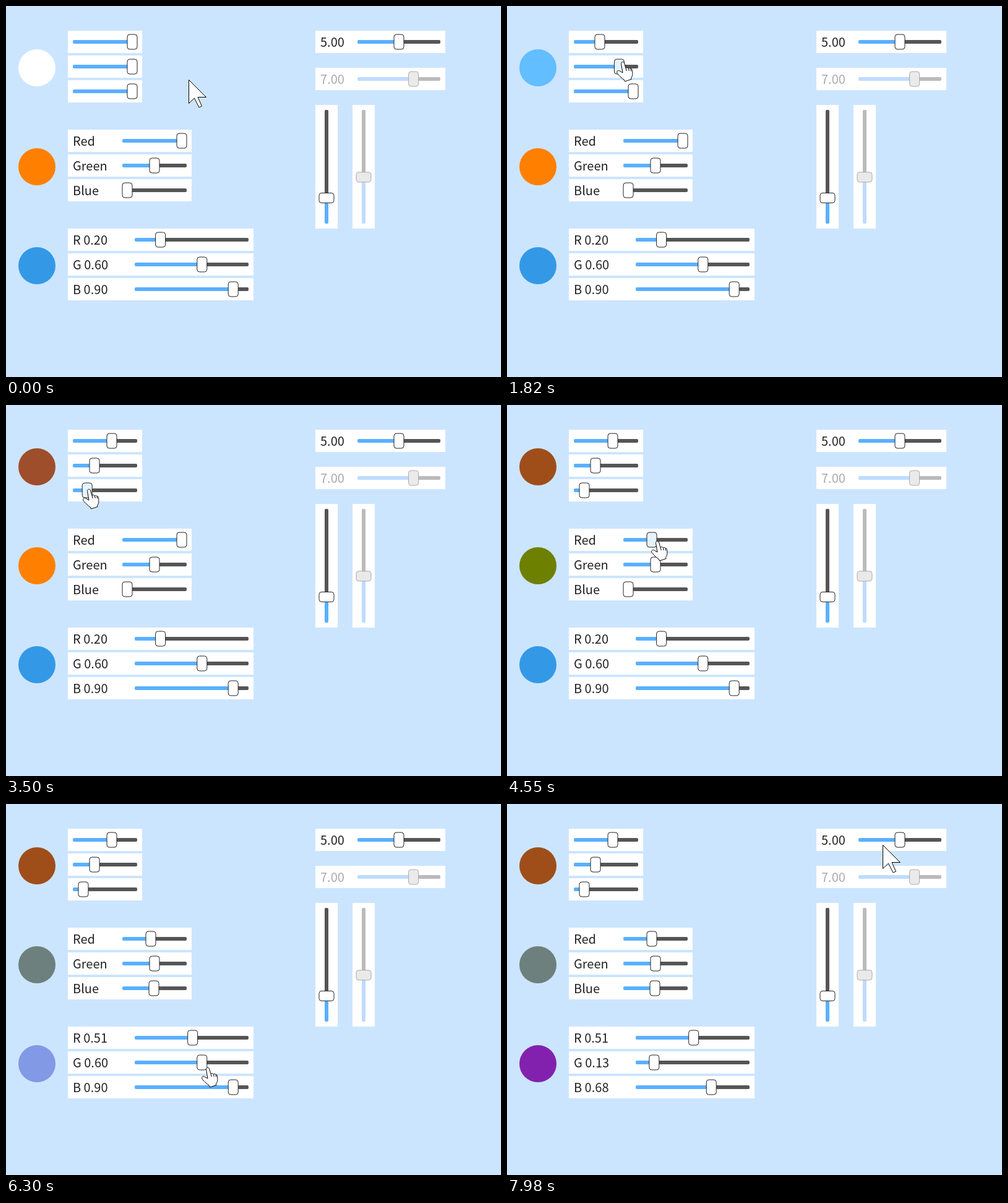
An HTML page with a canvas that plays this animation: 800 px wide and 600 px high, repeating every 8 s.

```html
<!DOCTYPE html>
<html lang="en">
<head>
<meta charset="utf-8">
<title>Sliders</title>
<style>
html, body { margin: 0; width: 100%; height: 100%; overflow: hidden; background: #cce5ff; }
canvas { display: block; }
</style>
</head>
<body>
<canvas id="stage" width="800" height="600"></canvas>
<script>
const ctx = document.getElementById('stage').getContext('2d');
const LOOP = 8000, STEP = 70;
const START = { x: 295, y: 119 }, END = { x: 607, y: 66 };

const group = (y, w, inset, labels, values) => labels.map((label, i) =>
  ({ x: 100, y: y + 40 * i, w, inset, label, start: values[i] }));
const sliders = [
  ...group(40, 120, 8, ['', '', ''], [1, 1, 1]),
  ...group(200, 200, 88, ['Red', 'Green', 'Blue'], [1, .5, 0]),
  ...group(360, 300, 108, ['R #', 'G #', 'B #'], [.2, .6, .9]),
  { x: 500, y: 40, w: 210, inset: 68, label: '5.00', start: .5 },
  { x: 500, y: 100, w: 210, inset: 68, label: '7.00', start: .7, off: true },
  { x: 500, y: 360, w: 200, inset: 8, label: '', start: .2, upright: true },
  { x: 560, y: 360, w: 200, inset: 8, label: '', start: .4, upright: true, off: true }
];

// The pointer reaches a thumb, grips it off-centre by dx, dy, drags it to a value and lets go.
const drag = (index, value, reach, release, dx, dy) => ({ index, value, reach, release, dx, dy });
const drags = [
  drag(0, .99, 700, 840, 1, -1),
  drag(0, .386, 910, 1400, 1, -1),
  drag(1, .307, 1680, 2240, 7, -6),
  drag(0, .625, 2520, 2870, 2, -4),
  drag(2, .102, 3150, 3710, 4, 0),
  drag(3, .432, 4200, 4550, 10, 4),
  drag(5, .489, 5040, 5320, 4, -3),
  drag(6, .51, 5740, 6090, 1, 0),
  drag(7, .13, 6300, 6860, 10, 10),
  drag(8, .68, 7280, 7490, -7, 2)
];

const arrow = new Path2D('M0 0V38L9 29.5 16.5 44.5 21 42.5 14.5 28H28Z');
const hand = new Path2D('M-4 1C-4.5 -2.5 0 -3.5 1 -.5L3.5 8C5 6.5 7 7 8 8.5' +
  'C9.5 7.3 11 7.8 11.7 9.5C13 8.7 14 10 14 12C14.5 17 15 20 12 24L12.5 26L2 29.5L.5 26.5' +
  'C-3 24.5 -6 21 -10 17C-12.5 13.5 -9 10.5 -6.5 12.5L-1.5 15.5Z');
const knuckles = new Path2D('M3.5 8L4.7 12.5M8 8.5L8.8 12.5M11.7 9.5L12.2 13');

const clamp = v => Math.min(1, Math.max(0, v));
const mix = (a, b, f) => a + (b - a) * f;
const smooth = f => f * f * (3 - 2 * f);
const easeOut = f => 1 - (1 - f) ** 3;
const range = s => s.w - s.inset - 24;
const thumb = (s, v) => s.inset + 8 + v * range(s);

function glide(from, to, t, t0, t1) {
  const f = smooth(clamp((t - t0) / (t1 - t0)));
  return { x: mix(from.x, to.x, f), y: mix(from.y, to.y, f) };
}

function stateAt(t) {
  const values = sliders.map(s => s.start);
  let pointer = START, free = 0, held = -1;
  for (const d of drags) {
    if (t < free) break;
    const s = sliders[d.index], grab = d.reach + STEP;
    const grip = () => ({ x: s.x + thumb(s, values[d.index]) + d.dx, y: s.y + 18 + d.dy });
    pointer = glide(pointer, grip(), t, free, d.reach);
    if (t >= grab) {
      const f = easeOut(clamp((t - grab) / (d.release - grab)));
      values[d.index] = mix(values[d.index], d.value, f);
      pointer = grip();
      if (t <= d.release) held = d.index;
    }
    free = d.release;
  }
  if (t > free) pointer = glide(pointer, END, t, free, LOOP - STEP);
  return { values, pointer, held };
}

function box(x, y, w, h, r, fill, stroke) {
  ctx.beginPath();
  ctx.roundRect(x, y, w, h, r);
  ctx.fillStyle = fill;
  ctx.fill();
  if (stroke) {
    ctx.strokeStyle = stroke;
    ctx.stroke();
  }
}

function drawSlider(s, v, held) {
  const left = s.inset, center = thumb(s, v);
  ctx.save();
  ctx.translate(s.x, s.y);
  if (s.upright) ctx.rotate(-Math.PI / 2);
  box(0, 0, s.w, 36, 0, '#fff');
  box(center, 15, s.w - 8 - center, 6, 2, s.off ? '#bbb' : '#555');
  box(left, 15, center - left, 6, 2, s.off ? '#bfdbff' : '#5ab0ff');
  box(center - 8, 6, 16, 24, 4, s.off ? '#eaeaea' : held ? '#e6f3ff' : '#fff', s.off ? '#aaa' : '#222');
  ctx.fillStyle = s.off ? '#aaa' : '#222';
  ctx.fillText(s.label.replace('#', v.toFixed(2)), 8, 26);
  ctx.restore();
}

function drawCursor(p, overThumb) {
  ctx.save();
  ctx.translate(Math.round(p.x) + .5, Math.round(p.y) + .5);
  ctx.fillStyle = '#fff';
  ctx.strokeStyle = '#000';
  ctx.lineJoin = 'round';
  const shape = overThumb ? hand : arrow;
  ctx.fill(shape);
  ctx.stroke(shape);
  if (overThumb) ctx.stroke(knuckles);
  ctx.restore();
}

function draw(t) {
  const { values, pointer, held } = stateAt(t);
  const overThumb = sliders.some((s, i) => !s.off && !s.upright &&
    Math.abs(pointer.x - s.x - thumb(s, values[i])) <= 10 &&
    Math.abs(pointer.y - s.y - 18) <= 14);

  ctx.fillStyle = '#cce5ff';
  ctx.fillRect(0, 0, 800, 600);
  ctx.font = '20px "Noto Sans CJK JP", "Noto Sans CJK SC", "Noto Sans CJK", "Noto Sans", sans-serif';
  ctx.lineWidth = 1;
  for (let g = 0; g < 3; g++) {
    const rgb = values.slice(g * 3, g * 3 + 3).map(v => Math.round(v * 255));
    box(20, 70 + 160 * g, 60, 60, 30, `rgb(${rgb})`);
  }
  sliders.forEach((s, i) => drawSlider(s, values[i], i === held));
  drawCursor(pointer, held >= 0 || overThumb);
}

function tick() {
  const t = performance.now() % LOOP;
  draw(Math.floor(t / STEP) * STEP);
  requestAnimationFrame(tick);
}
tick();
</script>
</body>
</html>
```
